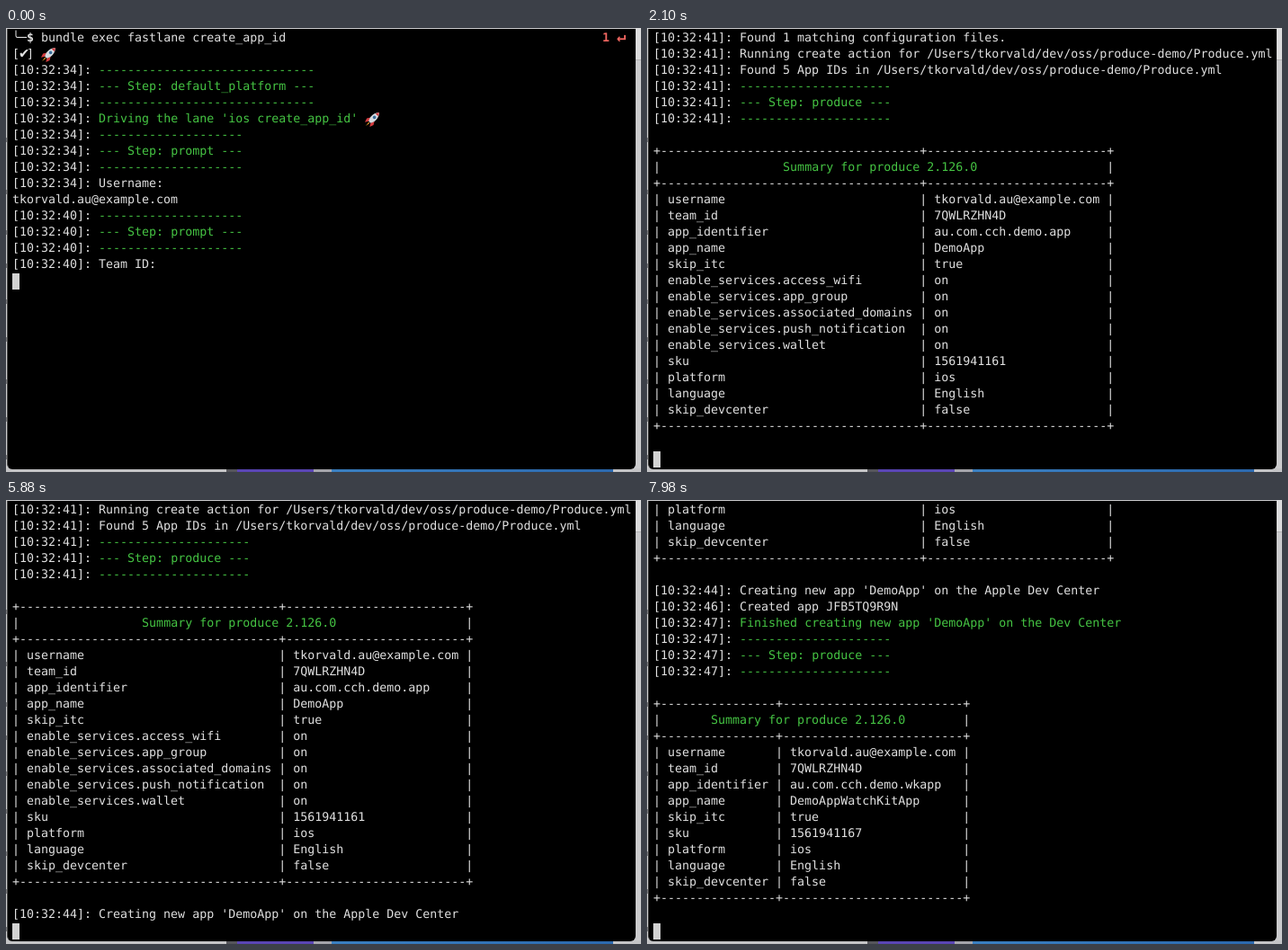
An HTML page for the animation above (8 s loop, 706x494 px).

```html
<!DOCTYPE html>
<html lang="en">
<head>
<meta charset="utf-8">
<title>Terminal session</title>
<style>
  html, body { margin: 0; width: 100%; height: 100%; overflow: hidden; }
  #stage { position: relative; width: 706px; height: 494px; overflow: hidden; background: #cbcbcd; }
  #stage > div { position: absolute; }
  .edge { left: 0; width: 1px; height: 5px; background: #77777a; }
  .rule { left: 700px; top: 0; width: 6px; height: 35px; background: #dcdcdd; border-bottom: 1px solid #b4b4b4; }
  .dock { left: 0; top: 490px; width: 706px; height: 4px;
    background: linear-gradient(90deg, #c4c4c6 245px, #55555a 245px 257px, #5a45b4 257px 342px,
      #a4a4aa 342px 362px, #3a7fc0 362px, #2c69ae 675px, #c4c4c6 675px); }
  #window { left: 1px; top: 1px; width: 699px; height: 490px; box-sizing: border-box;
    background: #000; border-left: 1px solid #4b4b4b; border-radius: 0 0 6px 6px; }
  #screen { inset: 0; color: #e0e0e0; white-space: pre; text-rendering: geometricPrecision;
    font: 13.3px/18px "DejaVu Sans Mono", monospace; }
  #screen > div { position: absolute; left: 7px; height: 18px; }
  #screen #cursor { width: 8px; background: #d2d2d2; }
  .green { color: #45c443; }
  .status { position: absolute; left: 656px; color: #ee655f; font-weight: bold; }
  .wide { display: inline-block; width: 8px; font-size: 17px; line-height: 0; font-weight: bold; }
  svg { position: absolute; top: 0; width: 17px; height: 17px; }
</style>
</head>
<body>
<div id="stage">
  <div class="rule"></div>
  <div class="dock"></div>
  <div id="window"></div>
  <div id="screen"><div id="cursor"></div></div>
</div>
<script>
const LOOP = 8000, ROWS = 27, TOP = 3, PITCH = 18, CELL = 8;
const EMAIL = 'tkorvald.au@example.com', TEAM = '7QWLRZHN4D';
const CONFIG = '/Users/tkorvald/dev/oss/produce-demo/Produce.yml';

const green = text => `<span class="green">${text}</span>`;
const wide = glyph => `<span class="wide">${glyph}</span>`;
const stamp = (second, text) => `[10:32:${second}]: ${text}`;
const rocket = column => `<svg style="left:${column * CELL}px" viewBox="0 0 16 16">
  <path d="M6 6 2 7 0 11 4 10ZM10 10 9 14 5 16 6 12Z" fill="#d43c3f"/>
  <path d="M4 11 1 15 5 12Z" fill="#f4a62a"/>
  <path d="M4 10C5 5 10 1 15 1 15 6 11 11 6 12Z" fill="#d5dbe0"/>
  <path d="M11 2 15 1 14 5Z" fill="#d43c3f"/>
  <circle cx="10" cy="6" r="1.7" fill="#3b6f9c"/></svg>`;

function step(second, name) {
  const title = `--- Step: ${name} ---`, rule = '-'.repeat(title.length);
  return [rule, title, rule].map(text => stamp(second, green(text)));
}

function table(entries) {
  const title = 'Summary for produce 2.126.0';
  const [keyWidth, valueWidth] = [0, 1].map(i => Math.max(...entries.map(e => e[i].length)));
  const border = `+${'-'.repeat(keyWidth + 2)}+${'-'.repeat(valueWidth + 2)}+`;
  const space = border.length - 2 - title.length, before = Math.floor(space / 2);
  const heading = `|${' '.repeat(before)}${green(title)}${' '.repeat(space - before)}|`;
  const rows = entries.map(([k, v]) => `| ${k.padEnd(keyWidth)} | ${v.padEnd(valueWidth)} |`);
  return ['', border, heading, border, ...rows, border, ''];
}

const summary = (id, name, sku, services = []) => table([
  ['username', EMAIL], ['team_id', TEAM], ['app_identifier', id], ['app_name', name],
  ['skip_itc', 'true'], ...services.map(s => ['enable_services.' + s, 'on']),
  ['sku', sku], ['platform', 'ios'], ['language', 'English'], ['skip_devcenter', 'false']
]);

const log = [
  `<b>╰─$</b> bundle exec fastlane create_app_id<span class="status">1 ${wide('↵')}</span>`,
  `[${wide('✔')}]` + rocket(4),
  ...step(34, 'default_platform'),
  stamp(34, green("Driving the lane 'ios create_app_id'")) + rocket(49),
  ...step(34, 'prompt'),
  stamp(34, 'Username:'),
  EMAIL,
  ...step(40, 'prompt'),
  stamp(40, 'Team ID:'),
  TEAM,
  stamp(41, 'Found 1 matching configuration files.'),
  stamp(41, 'Running create action for ' + CONFIG),
  stamp(41, 'Found 5 App IDs in ' + CONFIG),
  ...step(41, 'produce'),
  ...summary('au.com.cch.demo.app', 'DemoApp', '1561941161',
    ['access_wifi', 'app_group', 'associated_domains', 'push_notification', 'wallet']),
  stamp(44, "Creating new app 'DemoApp' on the Apple Dev Center"),
  stamp(46, 'Created app JFB5TQ9R9N'),
  stamp(47, green("Finished creating new app 'DemoApp' on the Dev Center")),
  ...step(47, 'produce'),
  ...summary('au.com.cch.demo.wkapp', 'DemoAppWatchKitApp', '1561941167')
];

// [time, lines printed, cursor line, cursor column]
const steps = [
  [0, 15, 15, 0], [140, 16, 15, TEAM.length], [910, 22, 22, 0], [980, 42, 42, 0],
  [4340, 43, 43, 0], [5950, 44, 44, 0], [7000, 48, 48, 0], [7070, 63, 63, 0]
];

const stage = document.getElementById('stage');
const screen = document.getElementById('screen');
const cursor = document.getElementById('cursor');

for (const y of [122, 180, 225, 262, 302, 344, 391, 433, 475]) {
  const mark = document.createElement('div');
  mark.className = 'edge';
  mark.style.top = y + 'px';
  stage.append(mark);
}

const lines = log.map(html => {
  const line = document.createElement('div');
  line.innerHTML = html;
  screen.append(line);
  return line;
});

const rowTop = row => TOP + row * PITCH + 'px';
let shown;

function render(now) {
  const time = now % LOOP;
  const current = steps.findLast(s => s[0] <= time);
  if (current !== shown) {
    shown = current;
    const [, printed, cursorLine, column] = current;
    const first = Math.max(0, cursorLine - ROWS + 1);
    lines.forEach((line, i) => {
      line.style.display = i >= first && i < printed ? '' : 'none';
      line.style.top = rowTop(i - first);
    });
    cursor.style.top = rowTop(cursorLine - first);
    cursor.style.left = 7 + column * CELL + 'px';
  }
}

const start = performance.now();
function tick() {
  render(performance.now() - start);
  requestAnimationFrame(tick);
}
tick();
</script>
</body>
</html>
```
